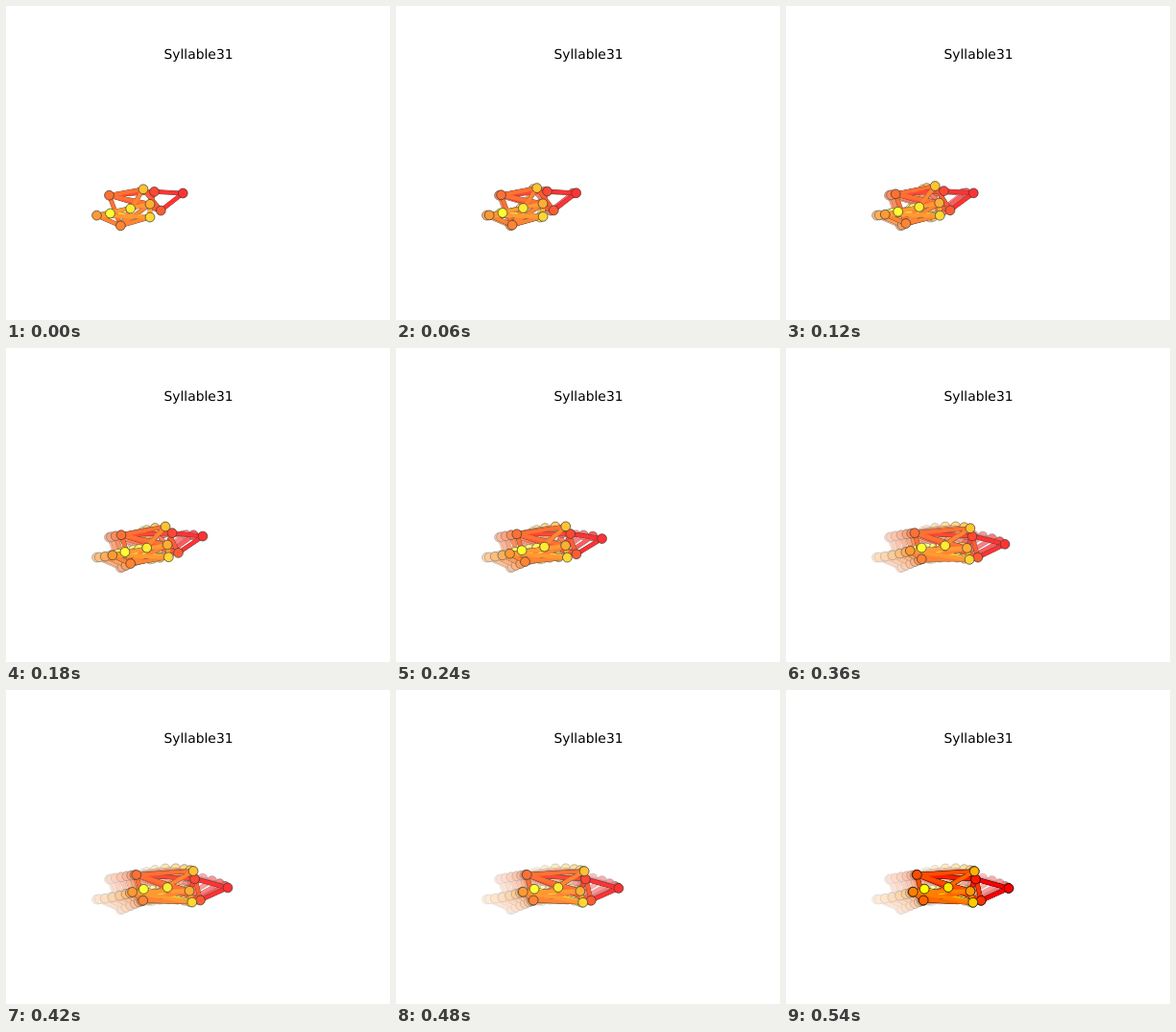
An HTML page with a canvas that plays this animation: 400x327 px, repeating every 0.6 s.

```html
<!DOCTYPE html>
<html lang="en">
<head>
<meta charset="utf-8">
<title>Syllable trajectory</title>
<style>
  html, body { margin: 0; width: 100%; height: 100%; overflow: hidden; background: #fff; }
  canvas { position: absolute; left: 0; top: 0; }
  h1 {
    position: absolute; left: 0; top: 43px; width: 401px; margin: 0;
    font: 13.89px/16px "DejaVu Sans", sans-serif; text-align: center; color: #000;
    text-rendering: geometricPrecision;
  }
</style>
</head>
<body>
<canvas id="stage" width="400" height="327"></canvas>
<h1>Syllable31</h1>
<script>
const STEP_MS = 60, STEPS = 10, VEIL = 0.2;
const ctx = document.getElementById('stage').getContext('2d');

// Each keypoint glides from one place to another, bowing vertically on the way.
const joints = [
  { from: [184.3, 195], to: [232, 206.5], bow: -4 },
  { from: [154.5, 193.4], to: [197.5, 197], bow: -2.3 },
  { from: [161.3, 213], to: [203.3, 219.3], bow: -2.4 },
  { from: [107.5, 197.2], to: [136.4, 192.4], bow: -0.4 },
  { from: [119.4, 228.8], to: [143.2, 219], bow: 0 },
  { from: [94.5, 218.1], to: [132.4, 210.2], bow: 1.2 },
  { from: [150, 206.3], to: [192, 209.5], bow: -2.8 },
  { from: [143, 190.8], to: [196.3, 188.8], bow: -4 },
  { from: [150, 220], to: [194.8, 221.3], bow: -2.9 },
  { from: [129.7, 211], to: [169, 205.5], bow: -0.5 },
  { from: [108.5, 216], to: [144.2, 207.2], bow: 0.3 }
];

// In painting order; a bone takes the colour of its first joint.
const bones = '0-1 0-2 1-3 1-6 2-3 2-7 8-10 6-8 3-4 3-6 3-7 4-5 4-6 4-7 4-8 5-6 5-8'
  .split(' ').map(b => b.split('-').map(Number));

const autumn = i => `rgb(255,${Math.round(255 * i / (joints.length - 1))},0)`;
const ease = u => 1 - (1 - u ** 1.8) ** 3.8;
const mix = (a, b, t) => a + (b - a) * t;

function poseAt(step) {
  const e = ease(step / (STEPS - 1));
  return joints.map(({ from, to, bow }) => [
    mix(from[0], to[0], e),
    mix(from[1], to[1], e) + 4 * e * (1 - e) * bow
  ]);
}

function line(a, b, color, width) {
  ctx.strokeStyle = color;
  ctx.lineWidth = width;
  ctx.beginPath();
  ctx.moveTo(...a);
  ctx.lineTo(...b);
  ctx.stroke();
}

function drawPose(pose) {
  for (const [a, b] of bones) line(pose[a], pose[b], '#000', 4.6);
  for (const [a, b] of bones) line(pose[a], pose[b], autumn(a), 4.17);
  ctx.strokeStyle = '#000';
  ctx.lineWidth = 0.7;
  pose.forEach(([x, y], i) => {
    ctx.fillStyle = autumn(i);
    ctx.beginPath();
    ctx.arc(x, y, 4.9, 0, 2 * Math.PI);
    ctx.fill();
    ctx.stroke();
  });
}

function fill(alpha) {
  ctx.fillStyle = `rgba(255,255,255,${alpha})`;
  ctx.fillRect(0, 0, 400, 327);
}

// Each pose is followed by a white veil, except the final one.
function drawStep(step) {
  fill(1);
  for (let s = 0; s <= step; s++) {
    drawPose(poseAt(s));
    if (s < STEPS - 1) fill(VEIL);
  }
}

let shown = -1;
const start = performance.now();
function tick() {
  const step = Math.floor((performance.now() - start) / STEP_MS) % STEPS;
  if (step !== shown) drawStep(shown = step);
  requestAnimationFrame(tick);
}
tick();
</script>
</body>
</html>
```
